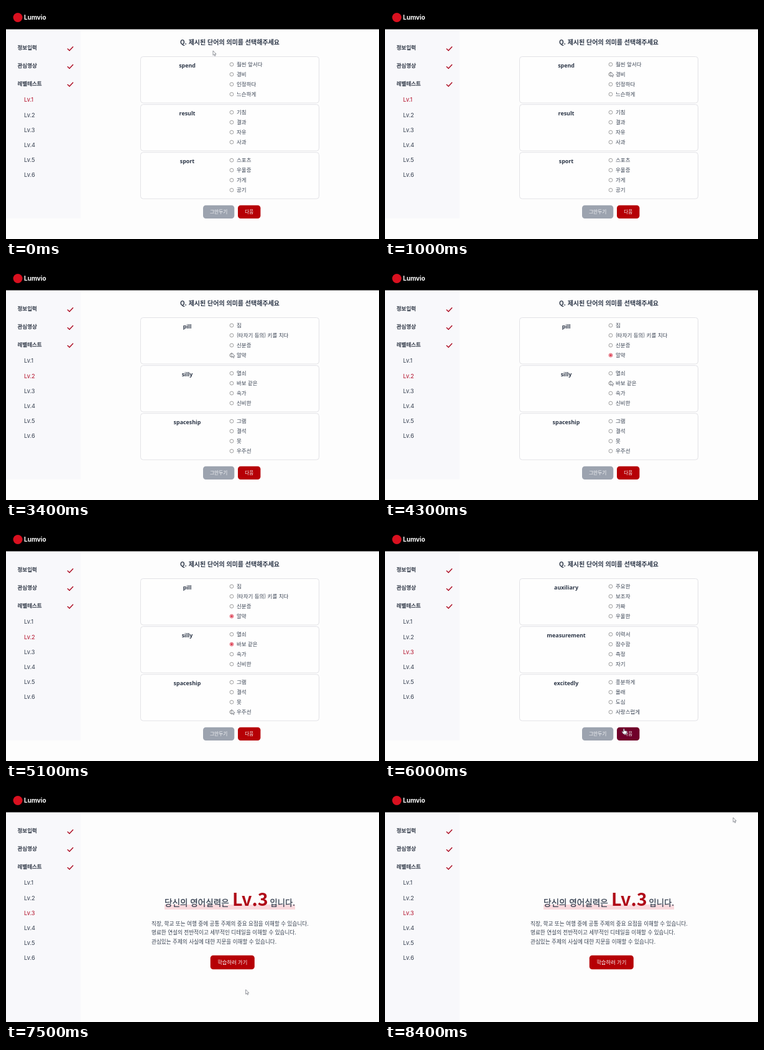
Recreate the animation shown at these times as an HTML page. Size 600 by 375 pixels, loop 8.5 s.

```html
<!DOCTYPE html>
<html lang="ko">
<head>
<meta charset="utf-8">
<title>Level test</title>
<style>
  html, body { margin: 0; width: 100%; height: 100%; overflow: hidden; background: #fdfdfd; }
  svg { display: block; width: 600px; height: 375px; }
  text { font-family: "Noto Sans CJK KR", "Noto Sans CJK", sans-serif; fill: #374151; white-space: pre; }
  .latin { font-family: Inter, sans-serif; }
  .word { font-family: "Noto Sans", sans-serif; font-weight: 700; }
  .bold { font-weight: 700; }
  .medium { stroke: #374151; stroke-width: 0.3px; }
  .middle { text-anchor: middle; }
</style>
</head>
<body>
<svg id="stage" viewBox="0 0 600 375"></svg>
<script>
const LOOP = 8500, STEP = 100, TRAVEL = 400;
const RED = '#b60005', DARK_RED = '#70002a', INK = '#2d3748', GREY = '#374151';
const RADIO_X = 363;
const stage = document.getElementById('stage');

// Each quiz is answered at an even pace: one click per card, then the next button.
const quizzes = [
  { first: 1100, gap: 600, answers: ['경비', '결과', '스포츠'], cards: {
    spend: ['훨씬 앞서다', '경비', '인정하다', '느슨하게'],
    result: ['기침', '결과', '자유', '사과'],
    sport: ['스포츠', '우울증', '가게', '공기'] } },
  { first: 3500, gap: 825, answers: ['알약', '바보 같은', '우주선'], cards: {
    pill: ['짐', '(타자기 등의) 키를 치다', '신분증', '알약'],
    silly: ['열쇠', '바보 같은', '속가', '신비한'],
    spaceship: ['그램', '결석', '못', '우주선'] } },
  { first: 6300, gap: 300, answers: ['주요한', '이력서', '흥분하게'], cards: {
    auxiliary: ['주요한', '보조자', '가짜', '우울한'],
    measurement: ['이력서', '잠수함', '측정', '자기'],
    excitedly: ['흥분하게', '몰래', '도심', '사랑스럽게'] } }
];

const cardTop = card => 81.5 + card * 77.1;
const optionY = (card, option) => cardTop(card) + 12.5 + option * 16;
const clickTime = (quiz, n) => quiz.first + n * quiz.gap;
const endTime = quiz => clickTime(quiz, 3);

function add(parent, tag, attrs = {}, content) {
  const node = document.createElementNS('http://www.w3.org/2000/svg', tag);
  for (const key in attrs) node.setAttribute(key, attrs[key]);
  if (content) node.textContent = content;
  return parent.appendChild(node);
}
const label = (parent, content, x, y, size, className = '', color = GREY) =>
  add(parent, 'text', { x, y, 'font-size': size, class: className, style: `fill:${color}` }, content);
const box = (parent, x, y, width, height, fill, attrs = {}) =>
  add(parent, 'rect', { x, y, width, height, fill, ...attrs });
const show = (node, on) => node.setAttribute('display', on ? 'inline' : 'none');

function button(parent, x, y, width, height, fill, content, size) {
  const face = box(parent, x, y, width, height, fill, { rx: 4.5 });
  label(parent, content, x + width / 2, y + height / 2 + size * 0.36, size, 'middle', '#f6f6f8');
  return { face, fill, holds: (px, py) => px >= x && px <= x + width && py >= y && py <= y + height };
}

// Frame of the page
box(stage, 0, 0, 600, 375, '#fdfdfd');
const sidebar = box(stage, 0, 38, 120, 304, '#f8f8fb');
box(stage, 0, 0, 600, 37.5, '#000');
add(stage, 'circle', { cx: 19, cy: 18.5, r: 7.5, fill: '#d9101f' });
label(stage, 'Lumvio', 29, 22, 10, 'latin bold', '#fff');

['정보입력', '관심영상', '레벨테스트'].forEach((name, i) => {
  const y = 67.5 + i * 28.8;
  label(stage, name, 18.5, y + 2.9, 8.5, 'medium', '#1f2430');
  add(stage, 'path', { d: `M99.2 ${y + 1.4}l2.9 2.8l5.6 -6`, fill: 'none', stroke: '#ac0a20',
    'stroke-width': 1.4, 'stroke-linecap': 'round' });
});
const levels = Array.from({ length: 6 }, (_, i) =>
  label(stage, `Lv.${i + 1}`, 29, 154.4 + i * 24.2, 9.3, 'latin'));

// Quiz pages
const quizLayer = add(stage, 'g');
label(quizLayer, 'Q. 제시된 단어의 의미를 선택해주세요', 360, 62.3, 10, 'middle bold', INK);
for (let card = 0; card < 3; card++)
  box(quizLayer, 216.5, cardTop(card), 287, 74.5, '#fefefe', { rx: 4, stroke: '#e2e2e6' });
button(quizLayer, 317, 320.7, 50.3, 21.3, '#9ca3af', '그만두기', 7.7);
const next = button(quizLayer, 373, 320.7, 36.4, 21.3, RED, '다음', 7.5);

function addRadio(parent, y, content, chosenAt) {
  const ring = add(parent, 'circle', { cx: RADIO_X, cy: y, r: 2.9, fill: '#fff', 'stroke-width': 0.75 });
  const dot = add(parent, 'circle', { cx: RADIO_X, cy: y, r: 1.8, fill: '#d9293f' });
  label(parent, content, 371, y + 3.1, 8.5);
  return { ring, dot, y, chosenAt };
}

const pages = quizzes.map(quiz => {
  const group = add(quizLayer, 'g');
  const radios = Object.entries(quiz.cards).flatMap(([word, options], card) => {
    label(group, word, 291.5, cardTop(card) + 17.5, 8.9, 'word middle', INK);
    return options.map((option, i) => addRadio(group, optionY(card, i), option,
      option === quiz.answers[card] ? clickTime(quiz, card) : Infinity));
  });
  return { group, radios };
});

// Result page
const result = add(stage, 'g');
box(result, 255, 186, 210, 8, '#f9d9dd');
label(result, '당신의 영어실력은', 255, 188.3, 13.6, 'medium');
label(result, 'Lv.3', 364, 188.3, 28.6, 'bold', '#b00a18');
label(result, '입니다.', 424.5, 188.3, 13.3, 'medium');
['직장, 학교 또는 여행 중에 공통 주제의 중요 요점을 이해할 수 있습니다.',
 '명료한 연설의 전반적이고 세부적인 디테일을 이해할 수 있습니다.',
 '관심있는 주제의 사실에 대한 지문을 이해할 수 있습니다.'
].forEach((line, i) => label(result, line, 234, 220 + i * 14.3, 8.6));
const learn = button(result, 328.8, 267.8, 71, 22.5, RED, '학습하러 가기', 8.3);

// Pointer: it reaches every stop one step before the click there.
const outline = { fill: '#fff', stroke: '#666b75', 'stroke-width': 0.7, 'stroke-linejoin': 'round' };
const arrow = add(stage, 'path', { d: 'M0 0V7.3L1.7 5.8L2.8 8.4L4 7.9L2.9 5.3H5.1Z', ...outline });
const hand = add(stage, 'path', {
  d: 'M-.8 .8Q0 -.5 .8 .8V3.5L4 4.1Q4.8 4.4 4.6 5.5L4 8.8H-.8L-3 5.6Q-3.3 4.5 -2.2 4.7L-.8 5.8Z', ...outline });

const stops = [{ time: 0, x: 333, y: 72 }];
for (const quiz of quizzes) {
  Object.values(quiz.cards).forEach((options, card) => stops.push({
    time: clickTime(quiz, card), x: RADIO_X, y: optionY(card, options.indexOf(quiz.answers[card])) - 4 }));
  stops.push({ time: endTime(quiz), x: 385, y: 331 });
}
stops.push({ time: 7900, x: 389, y: 279 }, { time: LOOP, x: 560, y: 46 });

const smooth = k => k * k * (3 - 2 * k);

function pointerAt(t) {
  const i = stops.findIndex(stop => stop.time > t);
  const from = stops[i - 1], to = stops[i];
  const travel = Math.min(TRAVEL, to.time - from.time - STEP);
  const k = smooth(Math.min(1, Math.max(0, 1 - (to.time - STEP - t) / travel)));
  return [from.x + (to.x - from.x) * k, from.y + (to.y - from.y) * k];
}

function draw(now) {
  const t = Math.floor(now % LOOP / STEP) * STEP;
  const [x, y] = pointerAt(t);
  const finished = quizzes.filter(quiz => t >= endTime(quiz)).length;
  const done = finished === quizzes.length;
  const level = Math.min(finished, quizzes.length - 1);

  show(quizLayer, !done);
  show(result, done);
  sidebar.setAttribute('height', done ? 337 : 304);
  levels.forEach((node, i) => node.style.fill = i === level ? '#b3102a' : GREY);

  pages.forEach(({ group, radios }, i) => {
    show(group, i === level);
    for (const { ring, dot, y: cy, chosenAt } of radios) {
      const chosen = t >= chosenAt;
      const hover = Math.abs(x - RADIO_X) < 20 && Math.abs(y - cy) < 6;
      ring.setAttribute('stroke', chosen ? '#d9293f' : hover ? '#4f4f4f' : '#808080');
      show(dot, chosen);
    }
  });

  const target = done ? learn : next;
  const over = target.holds(x, y);
  target.face.setAttribute('fill', over ? DARK_RED : target.fill);
  for (const node of [arrow, hand]) node.setAttribute('transform', `translate(${x} ${y})`);
  show(arrow, !over);
  show(hand, over);
}

const began = performance.now();
function tick() {
  draw(performance.now() - began);
  requestAnimationFrame(tick);
}
tick();
</script>
</body>
</html>
```
